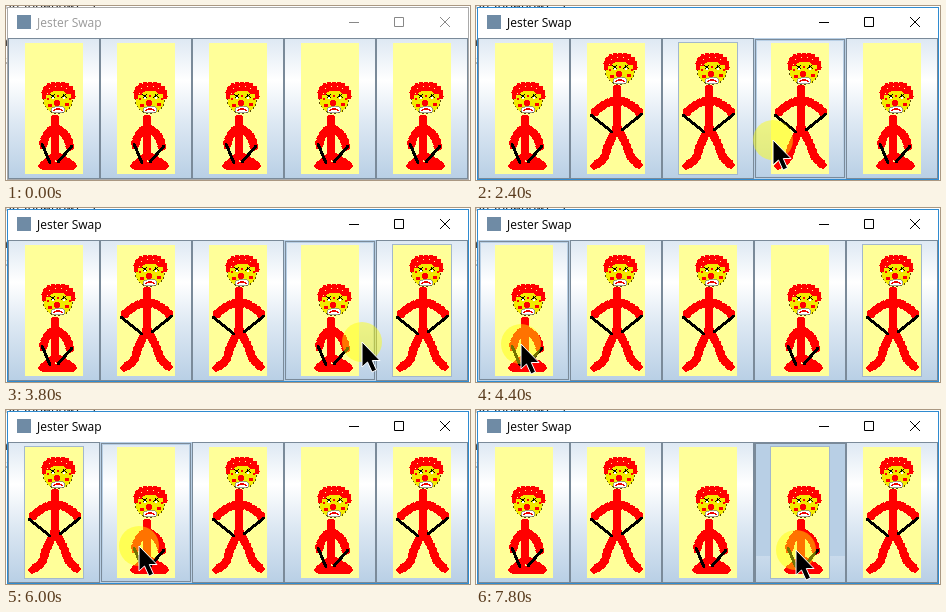
An HTML page for the animation above (8000 ms loop, 464x174 px).

```html
<!DOCTYPE html>
<html lang="en">
<head>
<meta charset="utf-8">
<title>Jester Swap</title>
<style>
html, body { margin: 0; width: 100%; height: 100%; overflow: hidden; background: #fff; }
svg { display: block; width: 464px; height: 174px; }
.code { font: 13px "Noto Sans Mono", "DejaVu Sans Mono", monospace; fill: #222; }
.title { font: 12px "Open Sans", "Noto Sans", sans-serif; }
.crisp { shape-rendering: crispEdges; }
.limb path { fill: none; stroke: #f00; stroke-linejoin: round; stroke-linecap: round; }
.hand { fill: none; stroke: #000; stroke-width: 3; stroke-linecap: round; stroke-dasharray: 4 1 3 1; }
</style>
</head>
<body>
<svg id="stage" viewBox="0 0 464 174">
  <defs>
    <linearGradient id="metal" x2="0" y2="1">
      <stop offset="0" stop-color="#dde8f3"/>
      <stop offset=".3" stop-color="#fff"/>
      <stop offset=".6" stop-color="#dde8f3"/>
      <stop offset="1" stop-color="#b8cfe5"/>
    </linearGradient>
    <clipPath id="card"><path d="M0 0H58V131H0Z"/></clipPath>
    <g id="head">
      <ellipse cx="33" cy="20" rx="14.5" ry="13.5" fill="#f2ea00" stroke="#5a4a00" stroke-dasharray="2 2"/>
      <path d="M21 15Q22 7 33 7T45 14" fill="none" stroke="#f00" stroke-width="7"/>
      <path d="M19 17Q17 4 33 4T48 17" fill="none" stroke="#f00" stroke-width="5" stroke-linecap="round" stroke-dasharray="0 4.5"/>
      <path d="M22 14Q23 6 33 6T44 13" fill="none" stroke="#ff9" stroke-dasharray="1 5"/>
      <path d="M22 18h2v2h-2zM44 18h2v2h-2zM23 24h4v3h-4zM40 23h4v3h-4zM32 15h2v2h-2z" fill="#f00"/>
      <path d="M25 14l5 4M30 14l-4 4M36 18l5-4M38 14l4 4" stroke="#000"/>
      <path d="M27 17h2v2h-2zM38 17h2v2h-2z" fill="#fff"/>
      <circle cx="32" cy="23" r="3.1" fill="#f00"/>
      <path d="M26 30Q26 27 33 26.5T40 30Q40 33 33 33T26 30Z" fill="#fff" stroke="#777" stroke-width=".7"/>
      <path d="M29 31Q29 29 33 29T37 31" fill="none" stroke="#e00" stroke-width="1.3"/>
    </g>
  </defs>
  <g class="code">
    <text x="-2" y="3">naShowBow( ) ;</text>
    <text x="-6" y="40">n</text><text x="-6" y="59">s</text><text x="-6" y="96">]</text>
  </g>
  <rect id="frame" class="crisp" x="1.5" y="1.5" width="461" height="172" fill="#fff"/>
  <rect x="11" y="9" width="14" height="14" fill="#6f8ba5"/>
  <text id="caption" class="title" x="31" y="21">Jester Swap</text>
  <path id="controls" d="M343 16.5H353M388.5 11.5H397.5V20.5H388.5ZM434 11L444 21M444 11L434 21" fill="none"/>
  <g id="buttons" class="crisp"></g>
  <g id="pointer">
    <circle id="halo" r="20"/>
    <path d="M0 0V25L5.5 20L10 30L14.5 28L10.3 18.5H18Z" fill="#000" stroke="#fff"/>
  </g>
</svg>
<script>
const LOOP = 8000, STEP = 200, COUNT = 5, WIDTH = 92;
const $ = id => document.getElementById(id);

// [press time, button]; a click flips the button and its neighbours on release
const clicks = [[1200, 2], [3400, 4], [4800, 0], [6200, 1], [7800, 3]];

// [time, x, y] of the pointer tip
const route = [
  [1000, 235, 142], [1200, 234, 134], [2000, 234, 134], [3000, 414, 134],
  [3600, 414, 134], [4400, 45, 136], [5000, 45, 136], [6000, 133, 136],
  [6400, 133, 136], [7000, 222, 140], [7400, 320, 140], [LOOP, 320, 140]
];

const rough = d => `<path d="${d}" stroke-width="7"/><path d="${d}" stroke-width="9" stroke-dasharray="0 5"/>`;
const clown = (headY, limbs, hands) =>
  `<g class="limb">${limbs.map(rough).join("")}</g>
   <path class="hand" d="${hands}"/><use href="#head" y="${headY}"/>`;

const standing = clown(7,
  ["M30 45V85", "M30 56Q18 58 8 68", "M30 56Q43 58 52 68",
   "M29 85L21 102L17 115L7 122", "M31 85L39 100L44 114L52 121"],
  "M4 71L25 88M55 70L35 86");
const crouching = clown(36,
  ["M30 75V112", "M30 84Q20 88 18 102", "M30 84Q43 88 45 103",
   "M30 111L22 119L17 122H31", "M30 111L42 118L48 122H31"],
  "M17 100L25 119M47 102L33 118");

const outline = (x, y, w, h, color) =>
  `<rect x="${x + .5}" y="${y + .5}" width="${w - 1}" height="${h - 1}" fill="none" stroke="${color}"/>`;

$("buttons").innerHTML = Array.from({ length: COUNT }, (_, i) => `
  <g transform="translate(${2 + i * WIDTH} 32)">
    <rect width="92" height="141" fill="url(#metal)"/>
    <rect class="down" width="92" height="114" fill="#b8cfe5"/>
    ${outline(0, 0, 92, 141, "#7a8a99")}
    <path class="down" d="M0 0H92V2H2V141H0Z" fill="#7a8a99"/>
    <g class="hover">${outline(0, 0, 92, 141, "#b8cfe5")}${outline(2, 2, 88, 137, "#b8cfe5")}${outline(1, 1, 90, 139, "#7a8a99")}</g>
    <g transform="translate(17 5)">
      <path d="M0 0H58V131H0Z" fill="#ff9"/>
      <g clip-path="url(#card)"><g transform="translate(0 1)">
        <g class="up">${standing}</g><g class="low">${crouching}</g>
      </g></g>
      <g class="focus">${outline(-1, -1, 60, 133, "#a3b8cc")}</g>
    </g>
  </g>`).join("");

const buttons = [...$("buttons").children];
const show = (node, on) => node.setAttribute("visibility", on ? "visible" : "hidden");
const toggle = (root, name, on) => root.querySelectorAll("." + name).forEach(n => show(n, on));

function pointerAt(t) {
  const i = Math.max(1, route.findIndex(k => k[0] > t));
  const [t0, x0, y0] = route[i - 1], [t1, x1, y1] = route[i];
  const p = Math.min(1, Math.max(0, (t - t0) / (t1 - t0)));
  const e = p * p * (3 - 2 * p);
  return [Math.round(x0 + (x1 - x0) * e), Math.round(y0 + (y1 - y0) * e)];
}

function render(time) {
  const t = Math.floor((time % LOOP) / STEP) * STEP;
  const [x, y] = pointerAt(t);
  const inside = t >= 1000, active = t >= 1200;
  const hovered = inside ? Math.floor((x - 2) / WIDTH) : -1;
  const up = Array(COUNT).fill(false);
  let focused = -1, pressed = -1, released = false;

  for (const [at, b] of clicks) {
    if (t < at) break;
    focused = b;
    if (t < at + STEP) { pressed = b; continue; }
    released = t < at + 2 * STEP;
    for (let i = b - 1; i <= b + 1; i++) if (i in up) up[i] = !up[i];
  }

  buttons.forEach((button, i) => {
    toggle(button, "up", up[i]);
    toggle(button, "low", !up[i]);
    toggle(button, "focus", i === focused);
    toggle(button, "down", i === pressed);
    toggle(button, "hover", i === hovered && i !== pressed);
  });
  $("frame").setAttribute("stroke", active ? "#2f8bd0" : "#aaa");
  $("caption").setAttribute("fill", active ? "#000" : "#999");
  $("controls").setAttribute("stroke", active ? "#000" : "#888");
  $("halo").setAttribute("fill", released ? "rgba(255,205,0,.5)" : "rgba(255,255,0,.45)");
  $("pointer").setAttribute("transform", `translate(${x} ${y})`);
  show($("pointer"), inside);
}

const start = performance.now();
function tick() {
  render(performance.now() - start);
  requestAnimationFrame(tick);
}
tick();
</script>
</body>
</html>
```
